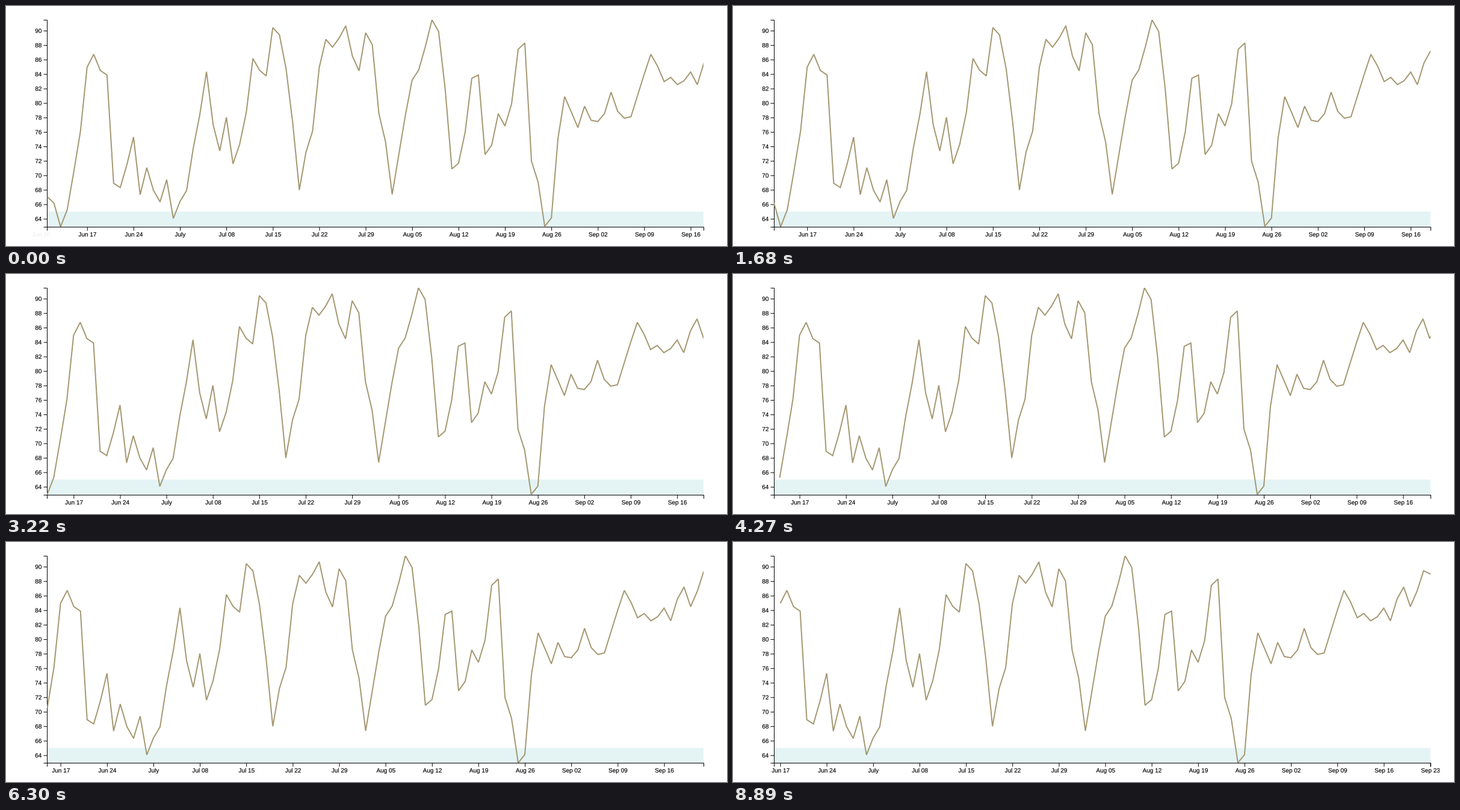
Write a matplotlib script that moves like this. It is 1198x400 px and loops after 8.96 s.

```python
import matplotlib.pyplot as plt
import numpy as np
from matplotlib.animation import FuncAnimation
from matplotlib.patches import PathPatch, Rectangle
from matplotlib.textpath import TextPath
from matplotlib.transforms import Affine2D

W, H, DPI = 1198, 400, 100
PX = 72 / DPI
FRAMES, INTERVAL = 128, 70

LEFT, RIGHT, TOP, BOTTOM = 68, 1159, 23, 368
SPAN = 99                       # days across the plot
STEP = (RIGHT - LEFT) / SPAN
PERIOD, DURATION, LEAD = 1575, 1050, 796    # ms
Y_MAX, BAND_TOP = 91.5, 65
LINE, BAND = "#a59872", "#e4f4f5"

# one reading per day, starting on June 11
VALUES = np.array([
    67.05, 66.16, 62.89, 65.25, 70.53, 76.1, 84.95, 86.73, 84.49, 83.87,
    68.9, 68.32, 71.47, 75.29, 67.33, 71.06, 67.95, 66.33, 69.4, 64.05,
    66.37, 67.91, 73.71, 78.44, 84.32, 77.03, 73.38, 78.02, 71.6, 74.29,
    78.69, 86.15, 84.53, 83.74, 90.42, 89.42, 84.74, 77.28, 67.99, 73.21,
    76.12, 84.9, 88.8, 87.72, 88.97, 90.67, 86.48, 84.45, 89.71, 88.06,
    78.52, 74.62, 67.37, 72.88, 78.35, 83.16, 84.57, 87.8, 91.5, 89.88,
    81.84, 70.89, 71.68, 75.95, 83.41, 83.87, 72.88, 74.17, 78.52, 76.82,
    79.85, 87.43, 88.3, 71.97, 69.07, 62.96, 64.09, 75.12, 80.88, 78.77,
    76.61, 79.56, 77.61, 77.44, 78.52, 81.5, 78.85, 77.9, 78.1, 81.05,
    83.99, 86.73, 85.11, 82.96, 83.54, 82.54, 83.08, 84.28, 82.54, 85.53,
    87.2, 84.5, 86.6, 89.43, 89.0, 88.6])

plt.rcParams["path.simplify"] = False
fig = plt.figure(figsize=(W / DPI, H / DPI), dpi=DPI, facecolor="white")
ax = fig.add_axes([0, 0, 1, 1])
ax.set_xlim(0, W)
ax.set_ylim(H, 0)
ax.axis("off")


def clip_area(x0, y0, x1, y1):
    return Rectangle((x0, y1), x1 - x0, y0 - y1, transform=ax.transData)


PLOT_AREA = clip_area(LEFT, TOP, RIGHT, BOTTOM)
LABEL_AREA = clip_area(0, 0, 1174, H)


def stroke(xs=(), ys=(), color="black", width=1, z=2):
    line, = ax.plot(xs, ys, color=color, lw=width * PX, zorder=z, snap=False,
                    solid_capstyle="butt", solid_joinstyle="miter")
    return line


class Label:
    """Text outline that can sit at fractional pixel positions."""

    def __init__(self, text, anchor):
        path = TextPath((0, 0), text, size=10,
                        prop={"family": "Liberation Sans"})
        box = path.get_extents()
        self.shift = -(box.x0 + anchor * box.width)
        self.patch = PathPatch(path, fc="black", ec="black", lw=0.15 * PX,
                               zorder=3, snap=False)
        ax.add_patch(self.patch)
        self.patch.set_clip_path(LABEL_AREA)

    def move(self, x, y):
        place = Affine2D().translate(self.shift, 0).scale(1, -1).translate(x, y)
        self.patch.set_transform(place + ax.transData)


def date_name(index):
    day = 11 + index
    for month, length in (("Jun", 30), ("Jul", 31), ("Aug", 31), ("Sep", 30)):
        if day <= length:
            break
        day -= length
    return "July" if (month, day) == ("Jul", 1) else f"{month} {day:02d}"


def ease(u):
    return 4 * u ** 3 if u < 0.5 else 1 - 4 * (1 - u) ** 3


band = Rectangle((LEFT, BOTTOM), RIGHT - LEFT, 0, fc=BAND, lw=0, zorder=1,
                 snap=False)
ax.add_patch(band)
curve = stroke(color=LINE, width=2, z=4)
curve.set_clip_path(PLOT_AREA)

# axis lines with their outer ticks
x0, x1, y0, y1 = LEFT + 0.5, RIGHT + 0.5, TOP + 0.5, BOTTOM + 0.5
stroke([x0 - 6, x0, x0, x0 - 6], [y0, y0, y1, y1])
stroke([x0, x0, x1, x1], [y1 + 6, y1, y1, y1 + 6])

x_ticks = [(i, stroke(), Label(date_name(i), 0.5)) for i in range(-1, 105, 7)]
y_ticks = [(v, stroke(), Label(str(v), 1)) for v in range(64, 92, 2)]


def tick_alpha(index, k, e):
    before = k - 1 <= index <= k - 1 + SPAN
    after = k <= index <= k + SPAN
    return before * (1 - e) + after * e


def draw(frame):
    clock = frame * INTERVAL + LEAD
    k = clock // PERIOD
    e = ease(min(1, clock % PERIOD / DURATION))
    first_day = k - 1 + e

    # the scale tightens once the lowest reading has left
    lows = [VALUES[j:j + SPAN + 1].min() for j in (max(k - 1, 0), k)]
    low = lows[0] + (lows[1] - lows[0]) * e

    def x_of(day):
        return LEFT + (day - first_day) * STEP

    def y_of(value):
        return BOTTOM - (value - low) / (Y_MAX - low) * (BOTTOM - TOP)

    days = np.arange(k, k + SPAN + 1)
    curve.set_data(x_of(days), y_of(VALUES[days]))
    band.set_height(y_of(BAND_TOP) - BOTTOM)

    for index, mark, label in x_ticks:
        x = x_of(index) + 0.5
        alpha = tick_alpha(index, k, e)
        mark.set_data([x, x], [y1, y1 + 6])
        label.move(x, BOTTOM + 16.1)
        for part in (mark, label.patch):
            part.set_visible(alpha > 0.001)
            part.set_alpha(alpha)

    for value, mark, label in y_ticks:
        y = y_of(value) + 0.5
        mark.set_data([x0 - 6, x0], [y, y])
        label.move(LEFT - 9, y + 3.2)
    return []


anim = FuncAnimation(fig, draw, frames=FRAMES, interval=INTERVAL,
                     init_func=lambda: draw(0), repeat=True, repeat_delay=0,
                     blit=False)
plt.show()
```
